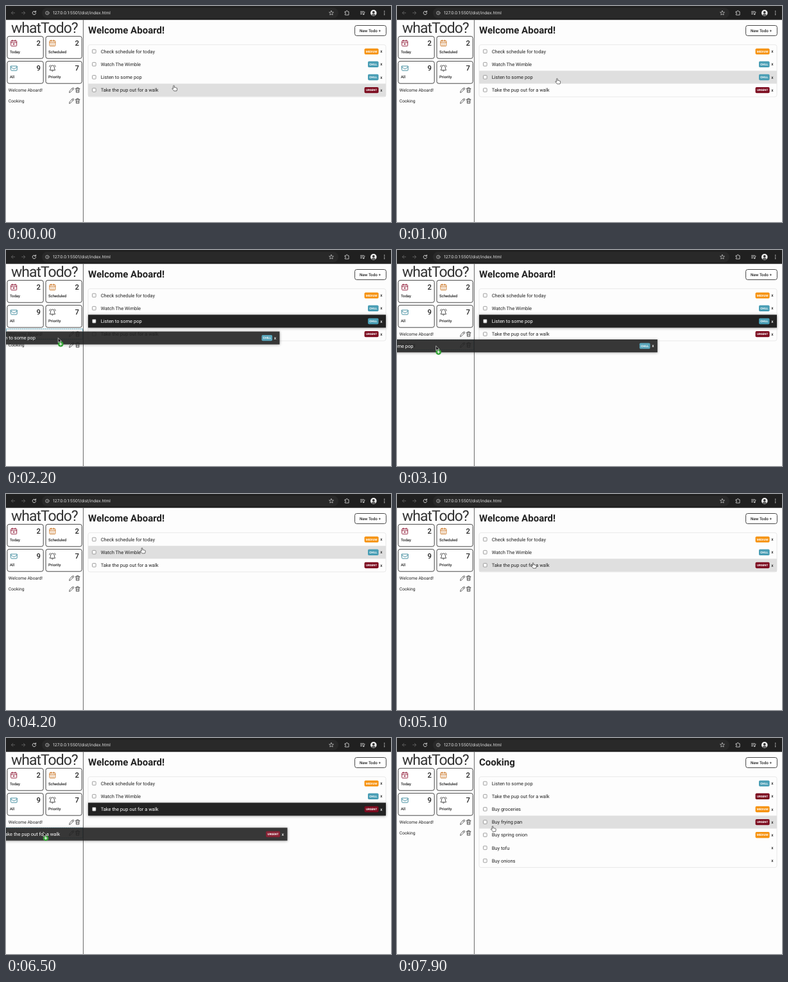
Recreate the animation shown at these times as an HTML page. Size 600x338 px, loop 8 s.

```html
<!DOCTYPE html>
<html lang="en">
<head>
<meta charset="utf-8">
<title>whatTodo?</title>
<style>
  html, body { margin: 0; width: 100%; height: 100%; overflow: hidden; background: #fdfdfd; }
  svg { display: block; width: 100vw; height: 100vh; }
  text { font-family: Roboto, "Open Sans", sans-serif; text-rendering: geometricPrecision; fill: #222; white-space: pre; }
  .url { font: 6.6px Inter, Roboto, sans-serif; fill: #e3e3e3; }
  .logo { font-size: 23px; letter-spacing: -1px; fill: #333; }
  .count { font-size: 11.25px; font-weight: 500; text-anchor: end; }
  .label { font-size: 6px; font-weight: 500; }
  .project { font-size: 6.75px; }
  .title { font-size: 15px; font-weight: 700; }
  .button { font-size: 6.3px; font-weight: 500; }
  .todo { font-size: 7.5px; }
  .tag { font-size: 4.5px; font-weight: 700; fill: #fff; text-anchor: middle; }
  .close { font-size: 6.5px; font-weight: 500; text-anchor: middle; }
  .dark text { fill: #fff; }
  .line { fill: none; stroke-linecap: round; stroke-linejoin: round; }
</style>
</head>
<body>
<svg viewBox="0 0 600 338" preserveAspectRatio="none">
  <defs>
    <filter id="shadow" x="-5%" y="-60%" width="110%" height="220%">
      <feDropShadow dx="0" dy="0.5" stdDeviation="2" flood-color="#000" flood-opacity=".4"/>
    </filter>
    <g id="calendar" class="line">
      <rect x=".5" y="1.3" width="9" height="8.4" rx="1"/>
      <path d="M.5 4H9.5M2.9 .3V2.2M7.1 .3V2.2"/>
    </g>
    <g id="tools" class="line" stroke="#333" stroke-width=".75">
      <path d="M98.7 135.2l.5-2.3 4.6-4.6q.9-.7 1.6 0t0 1.6l-4.6 4.7zM102.9 129.2l1.7 1.7"/>
      <path d="M108.2 129.3h6.8M109 129.3l.4 6h4.4l.4-6M110.3 129v-1.2h2.6V129M110.6 131v2.8M112.6 131v2.8"/>
    </g>
    <path id="hand" stroke="#222" stroke-width=".65" stroke-linejoin="round" fill="#fff"
      d="M-.8 .3Q0-.6.8.3L1 3.1Q1.9 2.5 2.5 3.3 3.3 2.8 3.9 3.7 5 3.4 5.2 4.5 5.4 6.2 4.5 8.4H.2Q-.8 6.9-2.5 5.2-2.9 4.2-1.7 4.1L-.7 4.8Z"/>
    <path id="arrow" stroke="#fff" stroke-width=".6" stroke-linejoin="round" fill="#111"
      d="M0 0V7.2L1.7 5.7 2.8 8.2 4 7.7 2.9 5.2H5.2Z"/>
    <g id="plus">
      <circle cx="4" cy="9.7" r="4.3" fill="#35a336"/>
      <path d="M1.8 9.7h4.4M4 7.5v4.4" stroke="#fff" stroke-width="1.1"/>
    </g>
  </defs>

  <rect width="600" height="338" fill="#fdfdfd"/>

  <!-- browser bar -->
  <rect width="600" height="21.7" fill="#202020"/>
  <rect x="56" y="2.8" width="462" height="16.2" rx="8.1" fill="#292929"/>
  <g class="line" stroke-width=".9">
    <path d="M13.6 10.8H8.6M10.8 8.4L8.4 10.8l2.4 2.4M24.6 10.8h5M27.4 8.4l2.4 2.4-2.4 2.4" stroke="#666"/>
    <path d="M46.2 9.4A2.7 2.7 0 1 0 46.6 11.4M46.5 7.7V9.7H44.5" stroke="#ddd"/>
    <circle cx="64.3" cy="10.9" r="2.7" stroke="#ccc" stroke-width=".7"/>
    <path d="M64.3 10.7v1.4M64.3 9.4v.1" stroke="#ccc" stroke-width=".7"/>
    <path d="M507 7.4l1 2.3 2.5.2-1.9 1.7.6 2.4-2.2-1.3-2.2 1.3.6-2.4-1.9-1.7 2.5-.2z" stroke="#ccc" stroke-width=".7"/>
    <path d="M528.4 8.8h1.7q.2-1.6 1.2-1.6t1.2 1.6h1.6v5.2h-5.7v-1.7q1.3-.1 1.3-1t-1.3-1z" stroke="#ddd" stroke-width=".8"/>
    <path d="M552.5 8.6h5.2M552.5 10.6h3.6M552.5 12.6h2.4M558 12.8V9.8h1.2" stroke="#ddd" stroke-width=".8"/>
  </g>
  <circle cx="557.2" cy="13" r="1" fill="#ddd"/>
  <circle cx="572.8" cy="10.9" r="4.8" fill="#f2f2f2"/>
  <path d="M569.6 14.2q.3-2 3.2-2t3.2 2q-3.2 2.6-6.4 0z" fill="#555"/>
  <circle cx="572.8" cy="9.9" r="1.9" fill="#333"/>
  <g fill="#ddd"><circle cx="589.7" cy="8.2" r=".75"/><circle cx="589.7" cy="10.9" r=".75"/><circle cx="589.7" cy="13.6" r=".75"/></g>
  <text class="url" x="73" y="13.3">127.0.0.1:5501/dist/index.html</text>

  <!-- sidebar -->
  <text class="logo" x="8" y="42">whatTodo?</text>
  <path d="M120.4 21.7V338" stroke="#555" stroke-width=".9"/>
  <g id="cards"></g>
  <g stroke-width=".9">
    <use href="#calendar" x="7.2" y="53" stroke="#8c1230"/>
    <circle cx="12.2" cy="59.7" r="1.1" fill="#8c1230"/>
    <use href="#calendar" x="67.4" y="53" stroke="#c9711c"/>
    <path d="M69.7 59h5.4M69.7 61h5.4" stroke="#c9711c" stroke-dasharray="1.1 1"/>
    <path class="line" d="M7.6 94h9.6v6q0 1-1 1H8.6q-1 0-1-1zM7.6 95.4l3 2.3q1.8 1.1 3.6 0l3-2.3" stroke="#2d7f93"/>
    <path class="line" d="M68.4 100q1.2-1.3 1.2-4.2t2.8-2.9 2.8 2.9 1.2 4.2zM71.4 101.8q1 .8 2 0M67.6 95q.2-1.7 1.5-2.7M77.2 95q-.2-1.7-1.5-2.7" stroke="#222" stroke-width=".8"/>
  </g>

  <rect x="543.6" y="30.5" width="48.8" height="16" rx="3" fill="#fff" stroke="#333" stroke-width=".9"/>
  <text class="button" x="551" y="40.8">New Todo +</text>

  <g id="scene"></g>
</svg>

<script>
const LOOP = 8000, TICK = 100;
const ROW_X = 128, ROW_W = 464, LIST_Y = 61, ROW_H = 20.17;
const COLORS = { MEDIUM: '#f6920f', CHILL: '#489db4', URGENT: '#7c0b1f' };
const PROJECTS = ['Welcome Aboard!', 'Cooking'];
const PROJECT_Y = 123, PROJECT_H = 17;

const pop = ['Listen to some pop', 'CHILL'];
const pup = ['Take the pup out for a walk', 'URGENT'];
const basics = [['Check schedule for today', 'MEDIUM'], ['Watch The Wimble', 'CHILL']];
const cooking = [pop, pup, ['Buy groceries', 'MEDIUM'], ['Buy frying pan', 'URGENT'],
  ['Buy spring onion', 'MEDIUM'], ['Buy tofu'], ['Buy onions']];

// start time, project index, todos
const VIEWS = [
  [0, 0, [...basics, pop, pup]],
  [3200, 0, [...basics, pup]],
  [6600, 0, basics],
  [7500, 1, cooking],
];

// start, drop, row, grab point inside the row
const DRAGS = [
  { from: 1500, to: 3200, row: 2, dx: 118.8, dy: 10 },
  { from: 5400, to: 6600, row: 2, dx: 83.5, dy: 6.6 },
];

// time, x, y of the pointer tip
const PATH = [
  [0, 261.5, 124.5], [100, 261, 124], [300, 261, 124], [600, 250, 114],
  [900, 250, 114], [1300, 246.5, 111.3], [1400, 246.5, 111.3], [1600, 238.5, 113],
  [2300, 72, 139], [2700, 61.5, 150], [2900, 61.5, 150], [3100, 60.7, 150],
  [3200, 61, 150], [3800, 198, 99], [4200, 212, 84.5], [4700, 212, 97],
  [5100, 212, 107.8], [5300, 212, 107.8], [6200, 58.3, 147], [6500, 58, 147],
  [6800, 56, 148], [6900, 56, 148], [7200, 47, 148], [7700, 47, 148],
  [7800, 92, 146], [7900, 149, 138], [8000, 149, 138],
];

const svgText = (cls, x, y, s) => `<text class="${cls}" x="${x}" y="${y}">${s}</text>`;
const rect = (x, y, w, h, rest) => `<rect x="${x}" y="${y}" width="${w}" height="${h}" ${rest}/>`;

function card(x, y, label, count) {
  return rect(x, y, 56.2, 34.8, 'rx="3" fill="#fff" stroke="#333" stroke-width=".9"') +
    svgText('count', x + 52, y + 14.6, count) + svgText('label', x + 4, y + 26.4, label);
}

function todo([name, tag], x, y, fill, dark) {
  const mid = y + ROW_H / 2;
  let s = `<g class="${dark ? 'dark' : ''}" transform="translate(${x} ${mid})">`;
  if (fill) s += rect(0, -ROW_H / 2, ROW_W, ROW_H, `fill="${fill}" ${dark ? 'filter="url(#shadow)"' : ''}`);
  s += rect(6.5, -2.9, 5.6, 5.6, 'rx="1" fill="#fff" stroke="#777" stroke-width=".7"');
  s += svgText('todo', 19.7, 2.6, name);
  if (tag) {
    const w = tag === 'CHILL' ? 16.6 : 22;
    s += rect(452.6 - w, -4.7, w, 9.4, `rx="1.8" fill="${COLORS[tag]}"`);
    s += svgText('tag', 452.6 - w / 2, 1.6, tag);
  }
  return s + svgText('close', 456.9, 2.1, 'x') + '</g>';
}

function pointer(t) {
  const i = PATH.findIndex((p, k) => t >= p[0] && t < PATH[k + 1][0]);
  const [t0, x0, y0] = PATH[i], [t1, x1, y1] = PATH[i + 1];
  const u = (t - t0) / (t1 - t0), e = u * u * (3 - 2 * u);
  return [x0 + (x1 - x0) * e, y0 + (y1 - y0) * e];
}

function draw(t) {
  const [x, y] = pointer(t);
  const [, active, todos] = VIEWS.filter(v => t >= v[0]).pop();
  const drag = DRAGS.find(d => t >= d.from && t < d.to);
  const overProject = x < 120 ? Math.floor((y - PROJECT_Y) / PROJECT_H) : -1;
  const overRow = x > ROW_X ? Math.floor((y - LIST_Y) / ROW_H) : -1;
  let s = svgText('title', ROW_X, 43.4, PROJECTS[active]);

  PROJECTS.forEach((name, i) => {
    const top = PROJECT_Y + i * PROJECT_H;
    if (overProject === i) {
      s += drag
        ? rect(.5, top + .5, 119, PROJECT_H - 1, 'fill="none" stroke="#489db4" stroke-dasharray="2 1"')
        : rect(0, top, 120, PROJECT_H, 'fill="#e0e0e0"');
    }
    s += svgText('project', 3.8, top + 11, name) + `<use href="#tools" y="${i * PROJECT_H}"/>`;
  });

  s += rect(ROW_X, LIST_Y - .4, ROW_W, todos.length * ROW_H + .8, 'rx="3" fill="none" stroke="#e4e4e4" stroke-width=".8"');
  todos.forEach((item, i) => {
    if (drag && drag.row === i) return;
    s += todo(item, ROW_X, LIST_Y + i * ROW_H, !drag && overRow === i ? '#dfdfdf' : '');
  });

  if (drag) {
    const item = todos[drag.row];
    s += todo(item, ROW_X, LIST_Y + drag.row * ROW_H, '#242424', true);
    s += `<g opacity=".9">${todo(item, x - drag.dx, y - drag.dy, '#242424', true)}</g>`;
  }

  const onItem = PROJECTS[overProject] || todos[overRow];
  s += `<g transform="translate(${x} ${y})">` +
    (drag ? '<use href="#plus"/><use href="#arrow"/>' : `<use href="#${onItem ? 'hand' : 'arrow'}"/>`) + '</g>';
  document.getElementById('scene').innerHTML = s;
}

document.getElementById('cards').innerHTML =
  card(2, 47.4, 'Today', 2) + card(62, 47.4, 'Scheduled', 2) +
  card(2, 86.4, 'All', 9) + card(62, 86.4, 'Priority', 7);

const start = performance.now();
let last = -1;
function frame() {
  const t = Math.floor(((performance.now() - start) % LOOP) / TICK) * TICK;
  if (t !== last) draw(last = t);
  requestAnimationFrame(frame);
}
frame();
</script>
</body>
</html>
```
